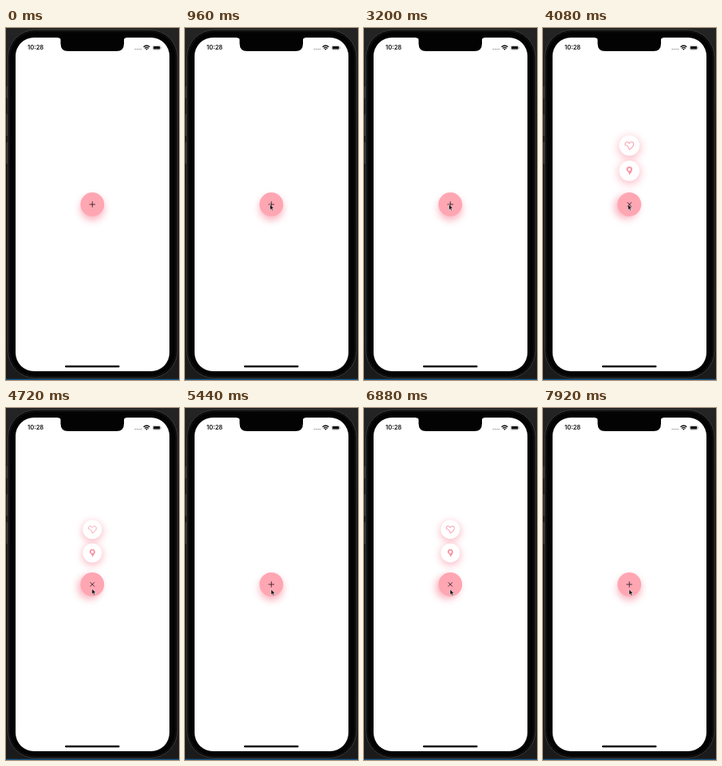
Recreate the animation shown at these times as an HTML page. Size 217 px wide and 441 px high, loop 8000 ms.

```html
<!DOCTYPE html>
<html lang="en">
<head>
<meta charset="utf-8">
<title>Floating action menu</title>
<style>
  html, body { margin: 0; width: 100%; height: 100%; overflow: hidden; background: #171717; }
  svg { display: block; width: 100vw; height: 100vh; }
  .clock { font: 600 7.6px Inter, Roboto, sans-serif; fill: #111; }
</style>
</head>
<body>
<svg viewBox="0 0 217 441" preserveAspectRatio="none">
  <defs>
    <filter id="blur" x="-100%" y="-100%" width="300%" height="300%">
      <feGaussianBlur stdDeviation="4.8"/>
    </filter>
    <linearGradient id="backdrop" x2="0" y2="1">
      <stop stop-color="#242424"/>
      <stop offset=".3" stop-color="#171717"/>
      <stop offset="1" stop-color="#1b1b1b"/>
    </linearGradient>
  </defs>

  <rect width="217" height="441" fill="url(#backdrop)"/>
  <rect y="439.7" width="217" height="1.3" fill="#155587"/>

  <!-- Phone -->
  <rect x="0" y="73" width="3" height="15" fill="#303030"/>
  <rect x="0" y="108" width="3" height="27" fill="#303030"/>
  <rect x="0" y="143" width="3" height="27" fill="#303030"/>
  <rect x="2.5" y="2.5" width="212.5" height="436" rx="34" fill="#030303" stroke="#3a3a3a"/>
  <rect x="4.5" y="4.5" width="208.5" height="432" rx="32" fill="none" stroke="#151515"/>
  <rect x="12" y="12" width="193" height="418" rx="23" fill="#fff"/>
  <path d="M65 11H151V12.2Q148 12.2 148 15V19.500Q148 29 138.500 29H78Q68.500 29 68.500 19.500V15Q68.500 12.200 65 12.200Z" fill="#030303"/>
  <rect x="74" y="422.800" width="68.500" height="2.500" rx="1.250" fill="#050505"/>

  <!-- Status bar -->
  <text class="clock" x="27" y="27.300">10:28</text>
  <path d="M161.600 26.500H170" stroke="#777" stroke-width="1.200" stroke-dasharray="1.200 1.150"/>
  <g fill="none" stroke="#111" stroke-width="1.350">
    <path d="M172.500 23.700Q176.400 20.300 180.300 23.700M174 25.400Q176.400 23.300 178.800 25.400"/>
    <rect x="184.200" y="22.300" width="9.600" height="4.900" rx="1.500" stroke="#999" stroke-width=".6"/>
  </g>
  <path d="M175.100 26.400Q176.400 25.300 177.700 26.400L176.400 27.700Z" fill="#111"/>
  <rect x="184.900" y="23" width="8.200" height="3.500" rx=".8" fill="#111"/>
  <rect x="194.300" y="23.900" width=".8" height="1.700" rx=".4" fill="#999"/>

  <!-- Menu -->
  <g id="heart" opacity="0">
    <circle cy="2.500" r="13" fill="#f02a4b" opacity=".3" filter="url(#blur)"/>
    <circle r="11.900" fill="#fff"/>
    <path d="M0 4.700C-2-3 -5 1.200 -5-1.300C-5-4.800 -1.300-5.100 0-2.500C1.300-5.100 5-4.800 5-1.300C5 1.200 2 3 0 4.700Z"
          fill="none" stroke="#f8a2b0" stroke-width="1"/>
  </g>
  <g id="pin" opacity="0">
    <circle cy="2.500" r="13" fill="#f02a4b" opacity=".3" filter="url(#blur)"/>
    <circle r="11.900" fill="#fff"/>
    <path d="M0 5.300C-1-1 -3.500 1.400 -3.500-1.500A3.500 3.500 0 0 1 3.500-1.500C3.500 1.400 1 3 0 5.300ZM0-3.100A1.600 1.600 0 1 0 0 .1A1.600 1.600 0 1 0 0-3.100Z"
          fill="#f798a7" fill-rule="evenodd"/>
  </g>
  <g id="toggle">
    <circle cy="4.950" r="14.800" fill="#f02a4b" opacity=".36" filter="url(#blur)"/>
    <circle r="14.900" fill="#ffa6b3"/>
    <path d="M-3.700 0H3.700M0-3.700V3.700" stroke="#2c2023" stroke-width=".85"/>
  </g>

  <path id="cursor" d="M0 0V6.900L1.600 5.500L2.700 8L3.900 7.500L2.800 5.100H4.900Z"
        fill="#0a0a0a" stroke="#fff" stroke-width=".5" stroke-linejoin="round"/>
</svg>

<script>
  const LOOP = 8000, STEP = 80;
  const CENTER = { x: 108.3, y: 221 };
  // Tap times; each tap flips between open and closed.
  const TAPS = [1100, 2500, 3750, 4900, 6000, 7250];
  const CURSOR = [
    [640, 108, 227], [880, 106.6, 221],
    [4450, 106.6, 221], [4800, 108, 227.2]
  ];
  const el = id => document.getElementById(id);
  const [heart, pin, toggle, cursor] = ['heart', 'pin', 'toggle', 'cursor'].map(el);

  // Underdamped spring from 0 to 1, t in seconds.
  function spring(t) {
    const stiffness = 230.2, decay = 8;
    const w = Math.sqrt(stiffness - decay * decay);
    return 1 - Math.exp(-decay * t) * (Math.cos(w * t) + decay / w * Math.sin(w * t));
  }

  function openness(t) {
    const count = TAPS.filter(tap => tap <= t).length;
    if (!count) return 0;
    const value = spring((t - TAPS[count - 1]) / 1000);
    return count % 2 ? value : 1 - value;
  }

  function cursorAt(t) {
    const next = CURSOR.findIndex(key => key[0] > t);
    if (next < 0) return CURSOR[CURSOR.length - 1].slice(1);
    const [t0, x0, y0] = CURSOR[Math.max(0, next - 1)];
    const [t1, x1, y1] = CURSOR[next];
    const p = Math.max(0, (t - t0) / (t1 - t0 || 1));
    const ease = p * p * (3 - 2 * p);
    return [x0 + (x1 - x0) * ease, y0 + (y1 - y0) * ease];
  }

  function placeItem(node, distance, open) {
    node.setAttribute('transform',
      `translate(${CENTER.x} ${CENTER.y - distance * open}) scale(${Math.max(0, open)})`);
    node.setAttribute('opacity', Math.min(1, Math.max(0, open * 2 - 1)));
  }

  function draw(t) {
    const open = openness(t);
    placeItem(heart, 68.8, open);
    placeItem(pin, 39.3, open);
    toggle.setAttribute('transform', `translate(${CENTER.x} ${CENTER.y}) rotate(${45 * open})`);
    cursor.setAttribute('transform', `translate(${cursorAt(t)})`);
    cursor.setAttribute('visibility', t < CURSOR[0][0] ? 'hidden' : 'visible');
  }

  const start = performance.now();
  function tick() {
    const t = (performance.now() - start) % LOOP;
    draw(Math.floor(t / STEP) * STEP);
    requestAnimationFrame(tick);
  }
  tick();
</script>
</body>
</html>
```
